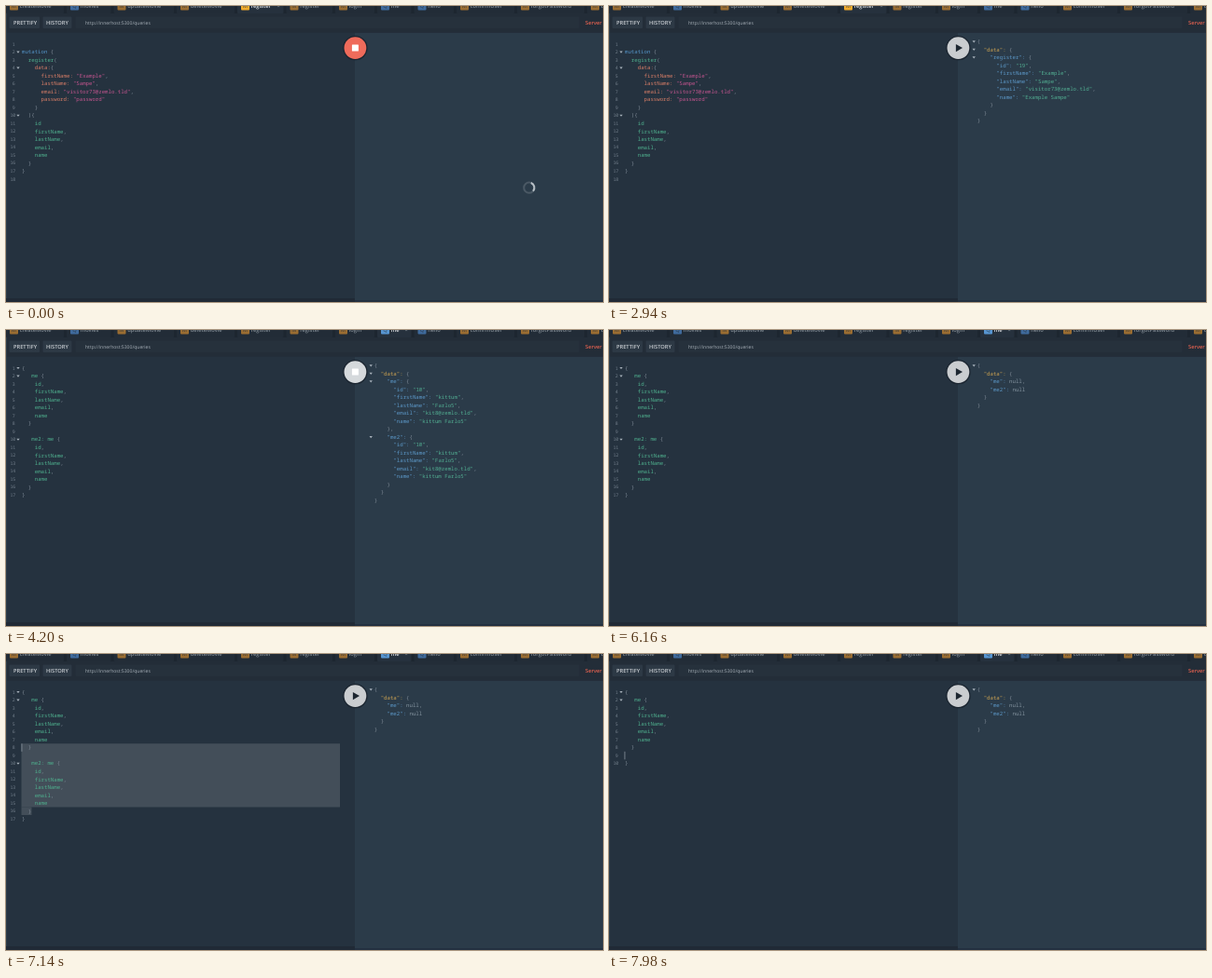
An HTML page for the animation above (8 s loop, 640 by 318 pixels).

```html
<!DOCTYPE html>
<html lang="en">
<head>
<meta charset="utf-8">
<title>Query editor</title>
<style>
  html, body { margin: 0; width: 100%; height: 100%; overflow: hidden; background: #25323f; }
  svg { display: block; width: 640px; height: 318px; }
  text { text-rendering: geometricPrecision; white-space: pre; }
  .code { font: 5.717px "Noto Sans Mono", "DejaVu Sans Mono", monospace; }
  .num { font: 4.9px "Noto Sans Mono", "DejaVu Sans Mono", monospace; fill: #75818d; text-anchor: end; }
  .ui { font: 600 5.72px "Open Sans", "Noto Sans", sans-serif; }
  .url { font: 5.05px "Open Sans", "Noto Sans", sans-serif; fill: #a9b2ba; }
</style>
</head>
<body>
<svg id="stage" viewBox="0 0 640 318" xmlns="http://www.w3.org/2000/svg"></svg>
<script>
const NS = 'http://www.w3.org/2000/svg';
const LOOP = 8000, CHAR = 3.43, LINE = 8.53;
const LEFT = { x: 17, y: 40.8 }, RIGHT = { x: 394.8, y: 38.1 };
const stage = document.getElementById('stage');

function add(parent, tag, attrs, text) {
  const el = document.createElementNS(NS, tag);
  for (const k in attrs) el.setAttribute(k, attrs[k]);
  if (text !== undefined) el.textContent = text;
  parent.appendChild(el);
  return el;
}
const rect = (x, y, width, height, fill, rx = 0, parent = stage) =>
  add(parent, 'rect', { x, y, width, height, fill, rx });
const show = (el, on) => el.setAttribute('visibility', on ? 'visible' : 'hidden');

// Backgrounds and toolbar
rect(0, 0, 640, 318, '#25323f');
rect(374, 28.7, 266, 290, '#2b3b49');
rect(0, 0, 640, 9, '#1d2630');
rect(0, 8, 640, 20.7, '#232d38');
rect(0, 0, .8, 318, '#32434f');
rect(0, 314, 374, 4, '#202a36');
rect(374, 316, 266, 2, '#233040');
rect(3.5, 11.5, 32.5, 12.6, '#2d3945', 1);
rect(39.5, 11.5, 31, 12.6, '#2d3945', 1);
rect(74.5, 11.5, 540, 12.6, '#26313c', 1);
add(stage, 'text', { x: 8, y: 20, class: 'ui', fill: '#c8cdd2' }, 'PRETTIFY');
add(stage, 'text', { x: 43, y: 20, class: 'ui', fill: '#c8cdd2' }, 'HISTORY');
add(stage, 'text', { x: 85, y: 19.7, class: 'url' }, 'http://innerhost:5300/queries');
add(stage, 'text', { x: 621, y: 20, class: 'ui', fill: '#e0604f' }, 'Server');

// Tabs: left edge, kind, label
const tabs = [
  [0, 'M', 'createMovie'], [65, 'Q', 'movies'], [115.5, 'M', 'updateMovie'],
  [183, 'M', 'deleteMovie'], [248, 'M', 'register'], [300.5, 'M', 'register'],
  [353, 'M', 'login'], [398, 'Q', 'me'], [437.5, 'Q', 'hello'],
  [483, 'M', 'confirmUser'], [548, 'M', 'forgotPassword'], [623, 'M', 'changePassword']
].map(([x, kind, label], i, all) => {
  const end = i + 1 < all.length ? all[i + 1][0] : 690;
  const back = rect(x, -4, end - x - 3, 12, '#222c37', 1);
  const icon = rect(x + 4, -4, 9, 8.4, '#000', 1);
  add(stage, 'text', {
    x: x + 8.5, y: 2, class: 'ui', fill: '#26303a', opacity: .6, 'text-anchor': 'middle'
  }, kind);
  const name = add(stage, 'text', { x: x + 14.7, y: 2.1, class: 'ui' }, label);
  const close = add(stage, 'text', { x: end - 10, y: 2.2, class: 'ui', fill: '#7b858e' }, '×');
  return { kind, back, icon, name, close };
});

function selectTab(active) {
  tabs.forEach((tab, i) => {
    const on = i === active;
    const tint = tab.kind === 'M' ? ['#9a6d32', '#f2ac2d'] : ['#3f6a9c', '#5795d0'];
    tab.back.setAttribute('fill', on ? '#26313d' : '#222c37');
    tab.icon.setAttribute('fill', tint[+on]);
    tab.name.setAttribute('fill', on ? '#e3e6e8' : '#7f8992');
    show(tab.close, on);
  });
}

// Code panes
const selection = add(stage, 'g', { fill: '#434e59' });
const selBody = rect(16.5, 0, 341.5, 0, '#434e59', 0, selection);
const selTail = rect(16.5, 0, 11, LINE, '#434e59', 0, selection);

function queryColor(token) {
  if (token[0] === '"') return '#c4558f';
  if (token === 'mutation') return '#5595c9';
  if (token === 'me2:') return '#4fb08e';
  if (token.endsWith(':')) return '#d97e67';
  return /\w/.test(token) ? '#4fb08e' : '#7f8b97';
}
function resultColor(token) {
  if (token === '"data":') return '#cda352';
  if (token.endsWith('":')) return '#5c98c8';
  if (token[0] === '"') return '#52ae92';
  return token === 'null' ? '#84939f' : '#7f8b97';
}

function pane(source, origin, folds, color, numbered) {
  const g = add(stage, 'g', {});
  source.split('\n').forEach((line, i) => {
    const mid = origin.y + i * LINE;
    if (numbered) add(g, 'text', { x: i < 9 ? 9.6 : 10.3, y: mid + 1.7, class: 'num' }, i + 1);
    if (folds.includes(i + 1)) {
      const x = numbered ? 13 : 391.2;
      add(g, 'path', { d: `M${x - 1.7} ${mid - .8}h3.4l-1.7 2.1z`, fill: '#a9b3bc' });
    }
    for (const m of line.matchAll(/"[^"]*":?|\w+:?|[^\s\w"]+/g))
      add(g, 'text', { x: origin.x + m.index * CHAR, y: mid + 1.9, class: 'code', fill: color(m[0]) }, m[0]);
  });
  return g;
}
const query = (source, folds) => pane(source, LEFT, folds, queryColor, true);
const result = (source, folds) => pane(source, RIGHT, folds, resultColor, false);

const fields = '    id,\n    firstName,\n    lastName,\n    email,\n    name\n  }';
const registerQuery = query(`
mutation {
  register(
    data:{
      firstName: "Example",
      lastName: "Sampe",
      email: "visitor73@zemlo.tld",
      password: "password"
    }
  ){
${fields.replace('id,', 'id')}
}
`, [2, 4, 10]);
const doubleQuery = query(`{
   me {
${fields}

   me2: me {
${fields}
}`, [1, 2, 10]);
const singleQuery = query(`{
   me {
${fields}

}`, [1, 2]);

const user = (key, id, first, last, email) => `    "${key}": {
      "id": "${id}",
      "firstName": "${first}",
      "lastName": "${last}",
      "email": "${email}",
      "name": "${first} ${last}"
    }`;
const wrap = body => `{\n  "data": {\n${body}\n  }\n}`;
const person = ['10', 'kittum', 'Farlo5', 'kit8@zemlo.tld'];
const registerResult = result(
  wrap(user('register', '19', 'Example', 'Sampe', 'visitor73@zemlo.tld')), [1, 2, 3]);
const userResult = result(
  wrap(user('me', ...person) + ',\n' + user('me2', ...person)), [1, 2, 3, 10]);
const nullResult = result(wrap('    "me": null,\n    "me2": null'), [1]);

const caret = rect(16.6, 0, .7, LINE, '#98a3ac');

// Spinner and run button
const spinner = add(stage, 'g', { fill: 'none', 'stroke-width': 2 });
add(spinner, 'circle', { cx: 0, cy: 0, r: 5.6, stroke: '#4b5965' });
add(spinner, 'path', { d: 'M1.9-5.27A5.6 5.6 0 0 1 4.29 3.6', stroke: '#b6bec5' });

add(stage, 'circle', { cx: 374.4, cy: 45.1, r: 13.2, fill: '#1b2530' });
const disc = add(stage, 'circle', { cx: 374.4, cy: 45.1, r: 11.9 });
const playIcon = add(stage, 'path', { d: 'M371.9 41L379 45.1L371.9 49.2z', fill: '#1c2630' });
const stopIcon = rect(370.9, 41.6, 7, 7, '#fff', .5);

const RED = [239, 107, 91], GREY = [202, 205, 208], PALE = [213, 217, 220];
const mix = (a, b, k) => `rgb(${a.map((v, i) => Math.round(v + (b[i] - v) * k))})`;
const lineTop = n => LEFT.y + (n - 1.5) * LINE;

const REPLY = 350, SWITCH = 3080, RUN = 4200, EMPTY = 4270, CUT = 7980;
// Time and first selected line while dragging upwards
const drag = [[6790, 16], [6860, 15], [7000, 13], [7070, 11], [7140, 8], [7770, 9]];

function render(t) {
  const loading = t < REPLY, onMe = t >= SWITCH;
  const rerun = t >= RUN && t < EMPTY;
  selectTab(onMe ? 7 : 4);

  show(registerQuery, !onMe);
  show(doubleQuery, onMe && t < CUT);
  show(singleQuery, t >= CUT);
  show(registerResult, !loading && !onMe);
  show(userResult, onMe && t < EMPTY);
  show(nullResult, t >= EMPTY);

  show(spinner, loading);
  spinner.setAttribute('transform', `translate(560.8 195.2) rotate(${t * .6})`);

  const fade = Math.min(1, Math.max(0, (t - REPLY) / 70));
  disc.setAttribute('fill', mix(RED, rerun ? PALE : GREY, fade));
  show(stopIcon, loading || rerun);
  show(playIcon, !loading && !rerun);

  const step = drag.filter(([time]) => t >= time).pop();
  const selecting = step && t < CUT;
  const first = step ? step[1] : 16;
  show(selBody, selecting && first < 16);
  show(selTail, selecting);
  show(caret, !!step);
  selBody.setAttribute('y', lineTop(first));
  selBody.setAttribute('height', lineTop(16) - lineTop(first));
  selTail.setAttribute('y', lineTop(16));
  caret.setAttribute('y', lineTop(first));
}

function tick() {
  render(performance.now() % LOOP);
  requestAnimationFrame(tick);
}
render(0);
requestAnimationFrame(tick);
</script>
</body>
</html>
```
